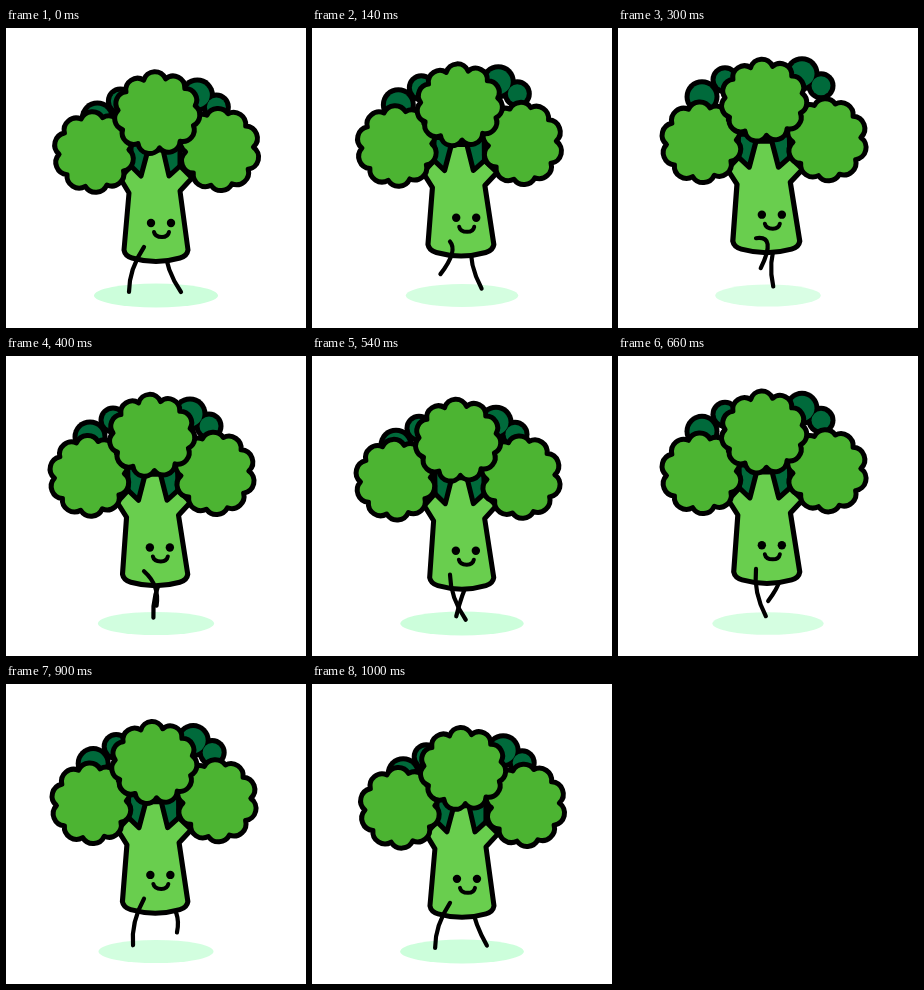
These frames come from a looping animation (300 by 300 pixels, 1.02 s). An HTML page with a canvas:

```html
<!DOCTYPE html>
<html lang="en">
<head>
<meta charset="utf-8">
<title>Walking broccoli</title>
<style>
html, body { margin: 0; width: 100%; height: 100%; overflow: hidden; background: #fff; }
canvas { display: block; }
</style>
</head>
<body>
<canvas id="stage" width="300" height="300"></canvas>
<script>
const ctx = document.getElementById('stage').getContext('2d');
const LOOP = 1020, STEP = 20, TURN = 2 * Math.PI;
const LEAF = '#4cb432', DARK = '#006a3b', STEM = '#69ce4e', LINE = 5, LEAN = 4.6;

// Ring of round bumps, one of them at the top
function cloud(cx, cy, rx, ry, count) {
  let d = '';
  for (let i = 0; i <= count; i++) {
    const a = (i + 0.5) / count * TURN - TURN * 0.26;
    const r = TURN * (rx + ry) / 2 / count * 0.55;
    const x = cx + rx * Math.cos(a), y = cy + ry * Math.sin(a);
    d += (i ? `A${r} ${r} 0 0 1 ` : 'M') + `${x} ${y}`;
  }
  return new Path2D(d + 'Z');
}

const front = cloud(151, 85, 39, 35, 11);
const left = cloud(88, 124, 35, 35.5, 10);
const right = cloud(213.5, 121.5, 34, 37, 10);
const hollow = new Path2D('M125 115H174V146H125Z');
const stem = new Path2D('M118 222L123 165L114 150L125 138L135 148L142 122H157L163 148' +
  'L174 138L186 150L174 163L182 222Q181 228 174 230Q150 237 126 230Q119 228 118 222Z');
const smile = new Path2D('M148 204Q149 209 156 209Q162 209 163 204');

ctx.lineCap = ctx.lineJoin = 'round';

function shape(path, fill, x = 0, y = 0) {
  ctx.save();
  ctx.translate(x, y);
  ctx.fillStyle = fill;
  ctx.fill(path);
  ctx.lineWidth = LINE;
  ctx.stroke(path);
  ctx.restore();
}

function dot(x, y, rx, ry, fill) {
  ctx.fillStyle = fill;
  ctx.beginPath();
  ctx.ellipse(x, y, rx, ry, 0, 0, TURN);
  ctx.fill();
}

// Two merged circles with a common outline
function pair(big, small) {
  for (const [grow, fill] of [[LINE / 2, '#000'], [-LINE / 2, DARK]]) {
    for (const [x, y, r] of [big, small]) dot(x, y, r + grow, r + grow, fill);
  }
}

// Height and lean of the walker: lowest twice per loop, leaning once
const liftAt = t => (1 - Math.cos(2 * TURN * t / LOOP)) / 2;
const leanAt = t => LEAN * ((1 + Math.cos(TURN * t / LOOP)) / 2) ** 6;

function leg(t, dx) {
  const angle = TURN * t / LOOP, lift = liftAt(t);
  const swing = Math.max(0, Math.sin(angle));
  const hipX = 138 + dx, hipY = 219 - 9.5 * lift;
  const runX = 0.5 - 15.5 * Math.cos(angle);
  const runY = 264 - 6 * lift - 19 * swing - hipY;
  const bow = 18 * swing - 5, tuck = 14 * swing ** 4;
  const bend = k => [hipX + runX * k + bow, hipY + runY * k - tuck];
  ctx.lineWidth = 4.2;
  ctx.beginPath();
  ctx.moveTo(hipX, hipY);
  ctx.bezierCurveTo(...bend(1 / 3), ...bend(2 / 3), hipX + runX, hipY + runY);
  ctx.stroke();
}

function draw(t) {
  const lift = liftAt(t), low = 1 - lift;
  const lean = leanAt(t), dx = lean - LEAN;

  ctx.clearRect(0, 0, 300, 300);
  ctx.globalAlpha = 0.72 + 0.28 * low;
  dot(150, 267.5, 52 + 10 * low, 11 + low, '#ccfedb');
  ctx.globalAlpha = 1;

  leg(t + LOOP / 2, 21);

  ctx.save();
  ctx.translate(lean * 1.6, 23 * low - 2);
  pair([84, 69, 15], [107, 52, 12]);
  pair([184, 46, 15], [203, 58, 12]);
  ctx.restore();

  // The body leans and widens to the left as it rises
  ctx.save();
  ctx.translate(182, 235 - 9.5 * lift);
  ctx.transform(1 + 0.05 * lift, 0, -dx * 0.004, 1, 0, 0);
  ctx.translate(-182, -235);
  shape(hollow, DARK);
  shape(stem, STEM);
  ctx.restore();

  ctx.save();
  ctx.translate(dx * 0.25, -9 * lift);
  dot(145, 195, 4.2, 4.2, '#000');
  dot(165, 195, 4.2, 4.2, '#000');
  ctx.lineWidth = 4;
  ctx.stroke(smile);
  ctx.restore();

  shape(left, LEAF, dx, -10.5 * lift);
  shape(right, LEAF, dx, -10.5 * lift);
  shape(front, LEAF, dx * 1.1, -13.5 * lift);
  leg(t, 0);
}

function tick() {
  draw(Math.floor(performance.now() / STEP) * STEP % LOOP);
  requestAnimationFrame(tick);
}
tick();
</script>
</body>
</html>
```
